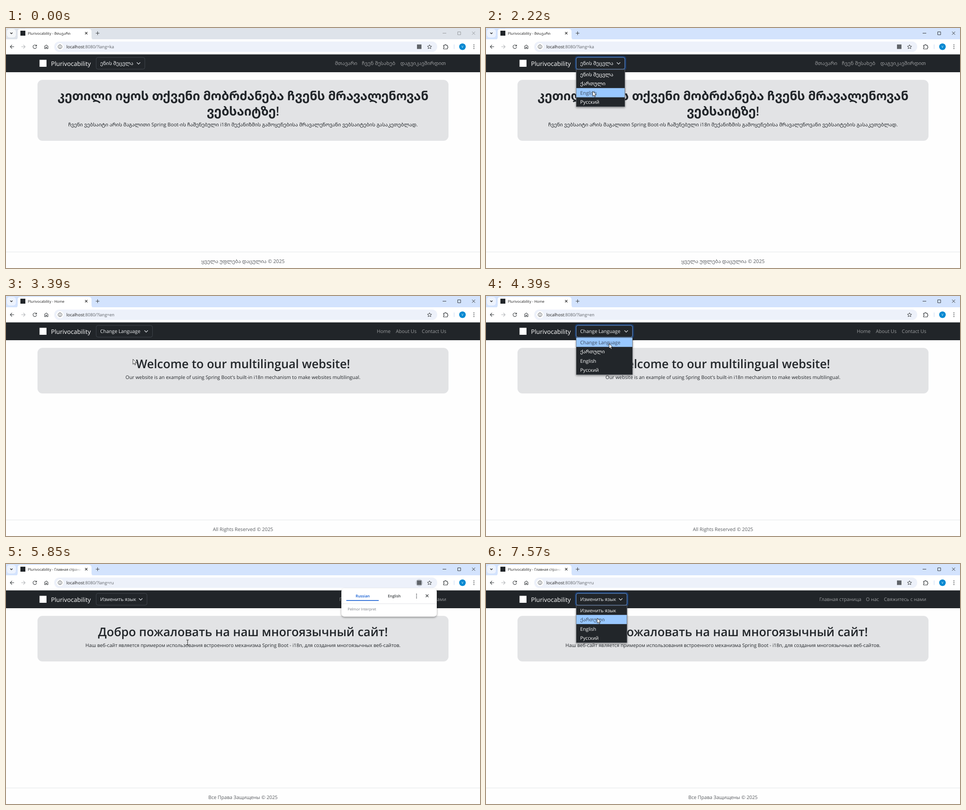
These frames come from a looping animation (1053x532 px, 8000 ms). An HTML page:

```html
<!DOCTYPE html>
<html lang="en">
<head>
<meta charset="utf-8">
<title>Language switch</title>
<style>
html, body { margin: 0; width: 100%; height: 100%; overflow: hidden; background: #fefefe; }
svg { display: block; width: 1053px; height: 532px; text-rendering: geometricPrecision;
  font-family: "Open Sans", "Noto Sans Georgian", "DejaVu Sans", sans-serif; }
</style>
</head>
<body>
<svg id="stage" viewBox="0 0 1053 532"></svg>
<script>
const LOOP = 8000, BRAND = 'Plurivocability', DARK = '#212529', INK = '#3c4043';

const pages = {
  ka: {
    title: 'მთავარი', pick: 'ენის შეცვლა', width: 108.5, translate: true, size: 11.05, headSize: 27.4,
    nav: [['მთავარი', 755.5], ['ჩვენ შესახებ', 827.7], ['დაგვიკავშირდით', 926.5]],
    head: ['კეთილი იყოს თქვენი მობრძანება ჩვენს მრავალენოვან', 'ვებსაიტზე!'],
    text: 'ჩვენი ვებსაიტი არის მაგალითი Spring Boot-ის ჩაშენებული i18n მექანიზმის გამოყენებისა მრავალენოვანი ვებსაიტების გასაკეთებლად.',
    foot: 'ყველა უფლება დაცულია © 2025'
  },
  en: {
    title: 'Home', pick: 'Change Language', width: 125.5, translate: false, size: 10.75, headSize: 26.5,
    nav: [['Home', 839], ['About Us', 889], ['Contact Us', 951]],
    head: ['Welcome to our multilingual website!'],
    text: "Our website is an example of using Spring Boot's built-in i18n mechanism to make websites multilingual.",
    foot: 'All Rights Reserved © 2025'
  },
  ru: {
    title: 'Главная страница', pick: 'Изменить язык', width: 113.3, translate: true, size: 10.7, headSize: 26.5,
    nav: [['Главная страница', 787], ['О нас', 858.5], ['Свяжитесь с нами', 931]],
    head: ['Добро пожаловать на наш многоязычный сайт!'],
    text: 'Наш веб-сайт является примером использования встроенного механизма Spring Boot - i18n, для создания многоязычных веб-сайтов.',
    foot: 'Все Права Защищены © 2025'
  }
};

// Pointer moves: start, end, target x, target y
const moves = [
  [30, 370, 337, 269], [550, 1215, 259, 81], [1400, 1900, 240, 125], [2040, 2220, 237, 140],
  [2850, 3320, 282, 140], [3390, 3900, 276, 79], [4200, 4700, 268, 160], [5170, 5470, 406, 176],
  [5800, 6390, 276, 76], [6900, 7570, 247, 120]
];
const clicks = [[1285, 1400], [2540, 2660], [3930, 4120], [4930, 5040], [6855, 7000]];
const menus = [[1285, 2620], [4000, 5010], [6855, LOOP]];
const rings = [[1380, 2700], [4080, 5080], [6930, LOOP]];

const clamp = v => Math.max(0, Math.min(1, v));
const within = (t, spans) => spans.find(([a, b]) => t >= a && t < b);

function pointer(t) {
  let x = 960, y = 512;
  for (const [a, b, tx, ty] of moves) {
    const k = clamp((t - a) / (b - a)), e = k * k * (3 - 2 * k);
    x += (tx - x) * e;
    y += (ty - y) * e;
  }
  return [x, y];
}

const rect = (x, y, w, h, fill, r = 0, more = '') =>
  `<rect x="${x}" y="${y}" width="${w}" height="${h}" rx="${r}" fill="${fill}" ${more}/>`;
const disc = (x, y, r, fill, more = '') => `<circle cx="${x}" cy="${y}" r="${r}" fill="${fill}" ${more}/>`;
const line = (d, color = INK, w = 1.1) =>
  `<path d="${d}" fill="none" stroke="${color}" stroke-width="${w}"/>`;
const text = (s, x, y, size, fill, more = '') =>
  `<text x="${x}" y="${y}" font-size="${size}" fill="${fill}" ${more}>${s}</text>`;
const mid = 'text-anchor="middle"';
const cross = (x, y, r, color, w) => line(`M${x - r} ${y - r}l${2 * r} ${2 * r}m0 ${-2 * r}l${-2 * r} ${2 * r}`, color, w);
const dots = (x, y) => [-4, 0, 4].map(d => disc(x, y + d, 1.1, INK)).join('');

function browser(id, page, active, loading, popup) {
  const url = `localhost:8080/?lang=${id}`, ctl = active ? '#1f1f1f' : '#8d9094';
  let s = rect(0, 0, 1053, 26, active ? '#d3e3fd' : '#dee3ea')
    + rect(0, 25, 1053, 33.5, '#fff')
    + rect(2, 2, 20, 19, active ? '#edf3fe' : '#f5f7f9', 6)
    + line('M9.5 10.3l2.5 2.5 2.5-2.5', '#1f1f1f', 1.3)
    + '<path d="M20 26q6 0 6-6V8q0-6 6-6h152q6 0 6 6v12q0 6 6 6z" fill="#fff"/>'
    + text(loading ? url : `${BRAND} - ${page.title}`, 48.5, 14.6, 8, '#1f1f1f')
    + rect(148, 4, 20, 18, 'url(#fade)') + rect(168, 4, 20, 18, '#fff')
    + cross(178.3, 11.5, 2.6, '#1f1f1f', 1.2)
    + line('M199.5 11.5h8m-4-4v8')
    + line('M970 11.5h8M1003.5 8.5h6.5v6.5h-6.5z', ctl, 0.9) + cross(1038.8, 11.5, 3.4, ctl, 0.9);
  s += loading
    ? disc(37.5, 11.5, 5.2, '#5f6368') + line('M33 10l3 1 1 3M37 7l2 3 3 0M38 15l3-2', '#fff', 1)
    : rect(32, 6, 11, 11, DARK);
  s += line('M18 41.5h-8.6m4-4l-4 4 4 4')
    + line('M34 41.5h8.6m-4-4l4 4-4 4', '#b4b7ba')
    + (loading ? cross(64, 41.5, 3.4) : line('M67.4 39.4a4 4 0 1 0 .6 2.6M68 37v3h-3'))
    + line('M85.8 45.8v-5.2l3.7-3 3.7 3v5.2h-2.6v-3.2h-2.2v3.2z')
    + rect(107, 30, 851, 23, '#edf1fa', 11.5)
    + disc(120, 41.5, 7.8, '#fff') + disc(120, 41.5, 4.2, 'none', `stroke="${INK}"`)
    + line('M120 41v3M120 39v1.2')
    + text(`localhost<tspan fill="#5f6368">${url.slice(9)}</tspan>`, 134, 45, 9.5, '#1f1f1f');
  if (page.translate && !loading)
    s += (popup > 0 ? disc(918, 41.5, 8, '#c9ced8', `opacity="${popup}"`) : '') + rect(913, 36.5, 10, 10, '#5f6368');
  return s + line('M940.8 37l1.4 3.1 3.4.3-2.6 2.2.8 3.3-3-1.8-3 1.8.8-3.3-2.6-2.2 3.4-.3z', INK, 1)
    + line('M972 38.3h2.8a1.6 1.6 0 0 1 3.2 0h2.4v2.6a1.6 1.6 0 0 1 0 3.2v2.4h-8.4v-2.6a1.5 1.5 0 0 0 0-3z', INK, 1.2)
    + line('M995.5 36.5v10', '#c5d7f2', 1)
    + disc(1014, 41.5, 7.3, '#0288d1') + text('V', 1014, 44, 6.8, '#fff', mid)
    + dots(1039.5, 41.5);
}

function site(page, loading, ring) {
  const shift = loading ? -9.2 : 0, x = 200.3 + shift, extra = (page.head.length - 1) * 34;
  let s = rect(0, 58, 1053, 40, DARK)
    + (loading ? '' : rect(74.5, 70.5, 15.5, 15.5, '#fff'))
    + text(BRAND, 100 + shift, 83.8, 13.6, '#fff');
  if (ring > 0) s += rect(x - 2.8, 62.2, page.width + 5.6, 32, '#0d6efd', 6, `opacity="${ring * 0.3}"`);
  s += rect(x, 65.2, page.width - 0.4, 26, DARK, 4, `stroke="${ring > 0.5 ? '#86b7fe' : '#495057'}" stroke-width=".8"`)
    + text(page.pick, x + 9, 82.3, page.size, '#f1f3f5')
    + line(`M${x + page.width - 18.2} 76.3l3.8 3.8 3.8-3.8`, '#dee2e6', 1.3);
  for (const [label, cx] of page.nav) s += text(label, cx, 82.3, page.size, '#9b9d9f', mid);
  s += rect(70, 115, 913, 101 + extra, '#e2e3e5', 11);
  page.head.forEach((row, i) => s += text(row, 526.5, 160 + i * 34, page.headSize, DARK, mid + ' font-weight="600"'));
  return s + text(page.text, 526.5, 184 + extra, page.size, DARK, mid)
    + rect(0, 496, 1053, 1, '#e3e6e9')
    + text(page.foot, 526.5, 521, page.size, '#585b5f', mid);
}

function menu(page, y) {
  const hot = Math.max(0, Math.floor((y - 92) / 20.5));
  let s = rect(200.3, 92, page.width - 0.4, 82.3, DARK, 0, 'stroke="#6b6f73" stroke-width=".8" filter="url(#shade)"');
  [page.pick, 'ქართული', 'English', 'Русский'].forEach((label, i) => {
    const top = 92.4 + i * 20.4;
    if (i === hot) s += rect(200.7, top, page.width - 1.2, 20.4, '#99c8ff');
    s += text(label, 209.3, top + 14.6, page.size, i === hot ? '#3c4a5a' : '#fff');
  });
  return s;
}

const bubble = opacity => `<g opacity="${opacity}">`
  + rect(745, 54, 212, 62.5, '#fff', 7, 'filter="url(#shade)"')
  + text('Russian', 792.5, 74, 8.4, '#0b57d0', mid + ' font-weight="600"')
  + text('English', 862.5, 74, 8.4, INK, mid + ' font-weight="600"')
  + rect(756, 80, 72, 1.6, '#0b57d0') + rect(745, 87.5, 212, 1, '#e0e2e5')
  + dots(912, 71) + cross(935.5, 70.5, 3, INK, 1.2)
  + text('Pelmor Interpret', 759, 103, 8.2, '#757980') + '</g>';

function cursor(id, x, y) {
  const overText = id === 'ru' && x > 206 && x < 847 && (y > 137 && y < 165 || y > 172 && y < 190);
  return `<g transform="translate(${x} ${y})">` + (overText
    ? line('M-2.5 -5.5h2l.5.5.5-.5h2M0 -5v10M-2.5 5.5h2l.5-.5.5.5h2', '#222', 1)
    : '<path d="M0 0v11.3l2.6-2.4 1.7 4 1.8-.8-1.7-3.9h3.5z" fill="#fff" stroke="#000" stroke-width=".8"/>') + '</g>';
}

const defs = `<defs>
<linearGradient id="fade"><stop stop-color="#fff" stop-opacity="0"/><stop offset="1" stop-color="#fff"/></linearGradient>
<filter id="shade" x="-20%" y="-20%" width="140%" height="140%"><feDropShadow dx="0" dy="2" stdDeviation="2" flood-opacity=".4"/></filter>
</defs>`;

function draw(t) {
  const id = t < 2700 ? 'ka' : t < 5080 ? 'en' : 'ru', page = pages[id];
  const loading = !!within(t, [[2700, 2870], [5080, 5250]]);
  const focus = within(t, rings), ring = focus ? clamp((t - focus[0]) / 110) : 0;
  const popup = Math.min(clamp((t - 5320) / 120), 1 - clamp((t - 6850) / 150));
  const [x, y] = pointer(t);
  let s = defs + rect(0, 0, 1053, 532, '#fefefe')
    + site(page, loading, ring) + browser(id, page, t >= 1215, loading, popup);
  if (within(t, menus)) s += menu(page, y);
  if (popup > 0) s += bubble(popup);
  if (within(t, clicks)) s += disc(x, y, 8.5, '#d8cc00', 'opacity=".72"');
  if (t >= 70) s += cursor(id, x, y);
  return s;
}

const stage = document.getElementById('stage');
let start, last;
function tick(now) {
  start ??= now;
  const markup = draw((now - start) % LOOP);
  if (markup !== last) stage.innerHTML = last = markup;
  requestAnimationFrame(tick);
}
requestAnimationFrame(tick);
</script>
</body>
</html>
```
